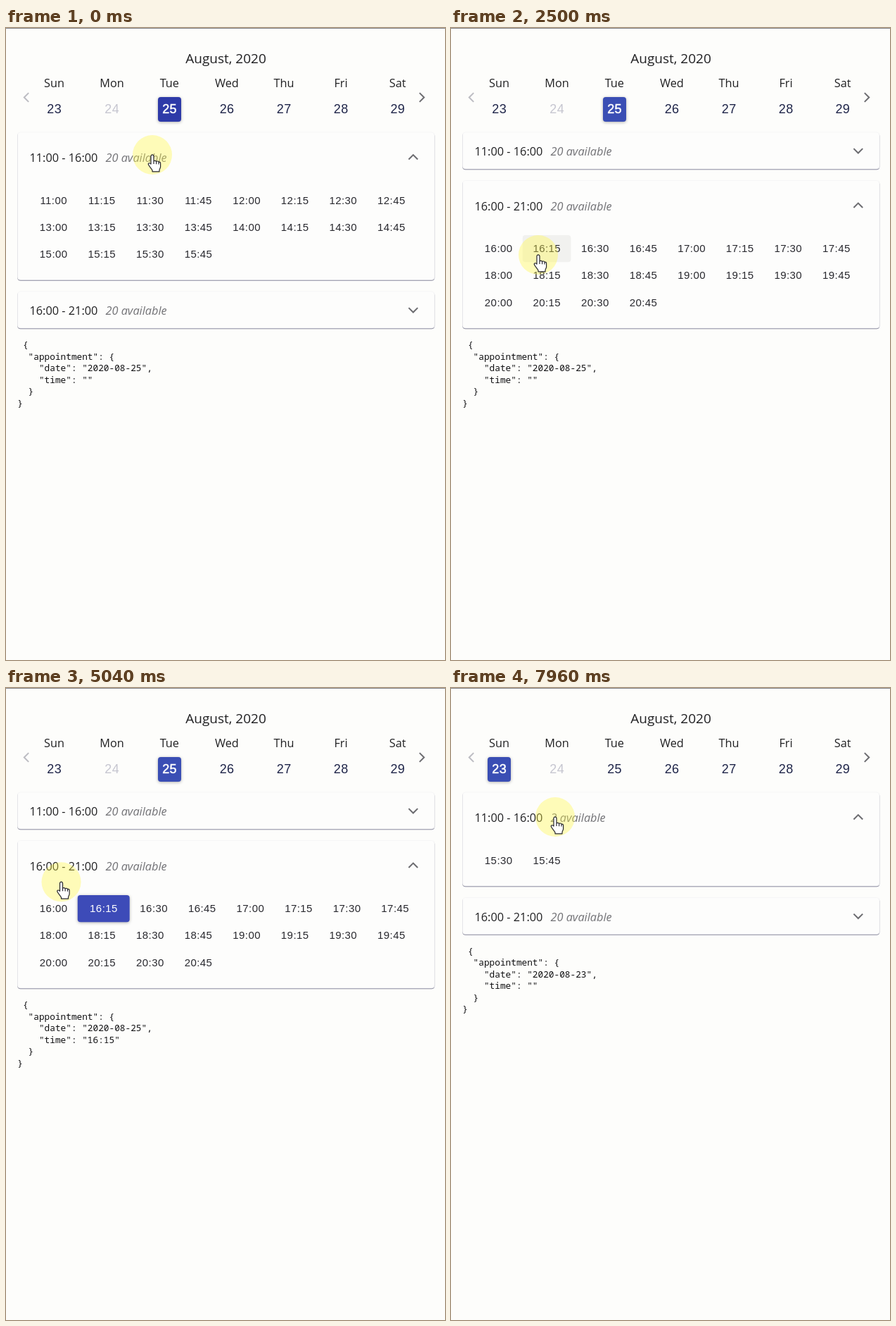
Animation of 624 by 897 pixels, one loop 8000 ms. Source, as an HTML page:

```html
<!DOCTYPE html>
<html lang="en">
<head>
<meta charset="utf-8">
<title>Appointment picker</title>
<style>
  html, body { margin: 0; width: 100%; height: 100%; overflow: hidden; background: #fdfdfb; }
  svg { display: block; width: 100vw; height: 100vh; }
  text { white-space: pre; }
  .ui { font: 16.3px "Open Sans", "Noto Sans", sans-serif; fill: #202022; }
  .title { font-size: 19px; }
  .count { font-style: italic; fill: #737377; }
  .date { font: 18px "Liberation Sans", sans-serif; letter-spacing: .4px; fill: #20264a; }
  .off { fill: #c6c6d0; }
  .slot { font: 15px "Liberation Sans", sans-serif; letter-spacing: .43px; fill: #29292f; }
  .date.on, .slot.on { fill: #fff; }
  .date.on { stroke: #fff; stroke-width: .5px; }
  .json { font: 500 12.77px "Noto Sans Mono", "DejaVu Sans Mono", monospace; fill: #101012; }
  .mid { text-anchor: middle; }
  .chev { fill: none; stroke: #6c6c70; stroke-width: 2; }
  .card { fill: #fdfdfc; stroke: #f1f1f3; stroke-width: .6; filter: drop-shadow(0 1.1px .7px rgba(50, 50, 85, .55)); }
  .lift { filter: drop-shadow(0 1.5px 2px rgba(0, 0, 0, .3)); }
</style>
</head>
<body>
<svg id="stage" viewBox="0 0 624 897"></svg>
<script>
const LOOP = 8000;
const PANEL_CLICK = 560, SLOT_CLICK = 3300, DAY_CLICK = 6250;
const TOP = 148, CLOSED = 52, GAP = 16.5, ROW = 38.25, COL = 68.6, LEFT = 33.2, GROW = 5.3;
const DAYS = ['Sun', 'Mon', 'Tue', 'Wed', 'Thu', 'Fri', 'Sat'];
const HAND = 'M-2 13V2C-2-.8 2-.8 2 2V9c.5-1 3.2-1 3.6.6.8-1 3-.8 3.4.8 1-.6 2.6 0 2.6 1.6V17' +
  'c0 2-1.6 3-1.6 5v1.8H0V22c-1-2.5-4.5-5.5-5.6-8.2-.8-2 1.6-3 3.6-.8zM2 9v4M5.6 9.6v3.6M9 10.4v3';
const ARROW = 'M0 0V16.5l4-3.6 2.6 6 2.6-1.1-2.6-5.9H11z';

// pointer stops: time, x, y
const PATH = [
  [40, 208, 180], [450, 108, 401], [800, 106, 405], [1200, 106, 405], [1660, 111, 397],
  [1850, 116, 391], [2080, 116, 391], [2500, 124, 322], [2770, 124, 322], [2960, 127, 317],
  [3100, 127, 317], [3470, 130, 315], [3890, 131, 326], [4020, 131, 326], [4350, 114, 511],
  [4600, 148, 508], [4810, 118, 518], [4860, 118, 518], [5180, 52, 112], [5370, 52, 112],
  [5740, 74, 117], [5920, 74, 117], [6150, 76, 114], [6400, 75, 115], [6710, 36, 130],
  [6760, 36, 130], [7080, 62, 192], [7370, 62, 457], [7540, 36, 376], [7590, 36, 376], [7960, 148, 183]
];

const stage = document.getElementById('stage');
const clamp = v => Math.min(1, Math.max(0, v));
const part = (t, a, b) => clamp((t - a) / (b - a));
const smooth = u => u * u * (3 - 2 * u);
const settle = u => { const s = smooth(u); return s * (2 - s); };
const inside = (p, b) => p.x >= b.x && p.x < b.x + b.w && p.y >= b.y && p.y < b.y + b.h;

const text = (x, y, cls, str) => `<text x="${x}" y="${y}" class="${cls}">${str}</text>`;
const rect = (b, attrs) => `<rect x="${b.x}" y="${b.y}" width="${b.w}" height="${b.h}" rx="4" ${attrs}/>`;
const clip = (id, b) => `<clipPath id="${id}">${rect(b, '')}</clipPath>`;
const chevron = (x, y, turn, color = '#6c6c70') =>
  `<path class="chev" style="stroke:${color}" d="M-6.4-3.2L0 3.2 6.4-3.2" transform="translate(${x} ${y}) rotate(${turn})"/>`;

function pointerAt(t) {
  const i = PATH.findIndex(k => k[0] >= t);
  if (i === 0) return { x: PATH[0][1], y: PATH[0][2] };
  if (i < 0) { const k = PATH[PATH.length - 1]; return { x: k[1], y: k[2] }; }
  const a = PATH[i - 1], b = PATH[i], u = smooth(part(t, a[0], b[0]));
  return { x: a[1] + (b[1] - a[1]) * u, y: a[2] + (b[2] - a[2]) * u };
}

function timesFrom(hour, skip) {
  return Array.from({ length: 20 - skip }, (_, n) => {
    const i = n + skip;
    return `${hour + (i >> 2)}:${String(i % 4 * 15).padStart(2, '0')}`;
  });
}

// growing circle left by a press, clipped to its button
function ripple(t, start, hold, box, x, y, size, color) {
  const k = smooth(part(t, start, start + 300));
  const fade = 1 - part(t, hold, hold + 350);
  if (!k || !fade) return '';
  return clip('rip' + start, box) +
    `<circle cx="${x}" cy="${y}" r="${size * k}" fill="${color}" opacity="${fade}" clip-path="url(#rip${start})"/>`;
}

function calendar(t, p, hits) {
  const picked = t < DAY_CLICK ? 2 : 0;
  let out = text(312.5, 50, 'ui title mid', 'August, 2020');
  out += chevron(29, 98.5, 90, '#bcbcc2') + chevron(591, 98.5, -90);
  DAYS.forEach((name, i) => {
    const x = 68.5 + 82.2 * i - .14 * i * i;
    const box = { x: Math.round(x - 16.3), y: 98, w: 33, h: 35 };
    const hot = i !== 1 && inside(p, box);
    if (i !== 1) hits.push(box);
    out += text(x, 84, 'ui mid', name);
    if (i === picked) {
      const warm = i === 2 ? smooth(part(t, 40, 300)) : smooth(part(t, DAY_CLICK, DAY_CLICK + 250));
      out += rect(box, `class="lift" fill="rgb(${46 + 12 * warm},${58 + 20 * warm},${168 + 12 * warm})"`);
    } else if (hot) out += rect(box, 'fill="#000" fill-opacity=".05"');
    if (i === 0) out += ripple(t, 5960, 6250, box, 71, 115, 17, 'rgba(50,55,70,.45)');
    out += text(x + .2, 121.3, 'date mid' + (i === picked ? ' on' : i === 1 ? ' off' : ''), 23 + i);
  });
  return out;
}

function slots(t, p, top, times, chosen, hits) {
  let out = '';
  times.forEach((time, i) => {
    const col = i % 8, row = i >> 3, on = i === chosen;
    const shift = chosen >= 0 && row === 0 && col > chosen ? GROW : 0;
    const box = { x: LEFT + col * COL + shift, y: top + 77.4 + row * ROW, w: COL + (on ? GROW : 0), h: ROW };
    hits.push(box);
    if (on) {
      const k = smooth(part(t, SLOT_CLICK - 60, SLOT_CLICK + 180));
      out += rect(box, `class="lift" fill="#3d4bb8" fill-opacity="${k}"`) +
        ripple(t, SLOT_CLICK - 150, 3480, { ...box, w: COL + 1 }, p.x, p.y, 75, 'rgba(170,170,170,.4)');
    } else if (inside(p, box)) out += rect(box, 'fill="#3c3c20" fill-opacity=".06"');
    out += text(box.x + box.w / 2 + .2, Math.round(box.y + 24.2), 'slot mid' + (on ? ' on' : ''), time);
  });
  return out;
}

function panel(t, p, id, top, open, label, times, chosen, hits) {
  const rows = Math.ceil(times.length / 8);
  const h = CLOSED + (94.75 + rows * ROW - CLOSED) * open;
  const box = { x: 16.5, y: top, w: 592.5, h };
  const mid = top + 27 + 9 * open;
  hits.push({ ...box, h: Math.min(h, CLOSED + 16.5 * open) });
  let out = rect(box, 'class="card"');
  if (open > .001) {
    out += clip(id, box) + `<g clip-path="url(#${id})">${slots(t, p, top, times, chosen, open > .5 ? hits : [])}</g>`;
  }
  out += text(33.5, mid + 6, 'ui', label) + text(141.5, mid + 6, 'ui count', times.length + ' available');
  out += chevron(578.8, mid - .7, 180 * open);
  return { out, bottom: top + h };
}

function json(top, date, time) {
  return ['{', '"appointment": {', `"date": "${date}",`, `"time": "${time}"`, '}', '}']
    .map((line, i) => text(16.3 + [1, 2, 4, 4, 2, 0][i] * 7.66, top + 28.2 + i * 16.5, 'json', line)).join('');
}

function pointer(t, p, hits) {
  const over = hits.some(b => inside(p, b));
  let out = `<circle cx="${p.x}" cy="${p.y}" r="28" fill="#fff646" fill-opacity=".37"/>`;
  for (const click of [PANEL_CLICK, SLOT_CLICK, 6120]) {
    const u = part(t, click - 100, click + 150);
    if (u > 0 && u < 1) {
      out += `<circle cx="${p.x}" cy="${p.y}" r="${10 + 14 * u}" fill="none" stroke="#ffc060" ` +
        `stroke-width="3" opacity="${.6 * (1 - u)}"/>`;
    }
  }
  return out + `<path d="${over ? HAND : ARROW}" transform="translate(${p.x} ${p.y})" ` +
    'fill="#fff" stroke="#26262c" stroke-width="1.2" stroke-linejoin="round"/>';
}

function draw(t) {
  const p = pointerAt(t), hits = [], later = t >= DAY_CLICK;
  const second = settle(part(t, PANEL_CLICK, 960)) - settle(part(t, DAY_CLICK, DAY_CLICK + 350));
  const chosen = t >= SLOT_CLICK && !later ? 1 : -1;
  const head = calendar(t, p, hits);
  const a = panel(t, p, 'early', TOP, 1 - second, '11:00 - 16:00', timesFrom(11, later ? 18 : 0), -1, hits);
  const b = panel(t, p, 'late', a.bottom + GAP, second, '16:00 - 21:00', timesFrom(16, 0), chosen, hits);
  stage.innerHTML = '<path d="M0 .5H624" stroke="#85858a"/>' + head + a.out + b.out +
    json(b.bottom, later ? '2020-08-23' : '2020-08-25', chosen > 0 ? '16:15' : '') + pointer(t, p, hits);
}

const begin = performance.now();
function tick() {
  draw((performance.now() - begin) % LOOP);
  requestAnimationFrame(tick);
}
tick();
</script>
</body>
</html>
```
